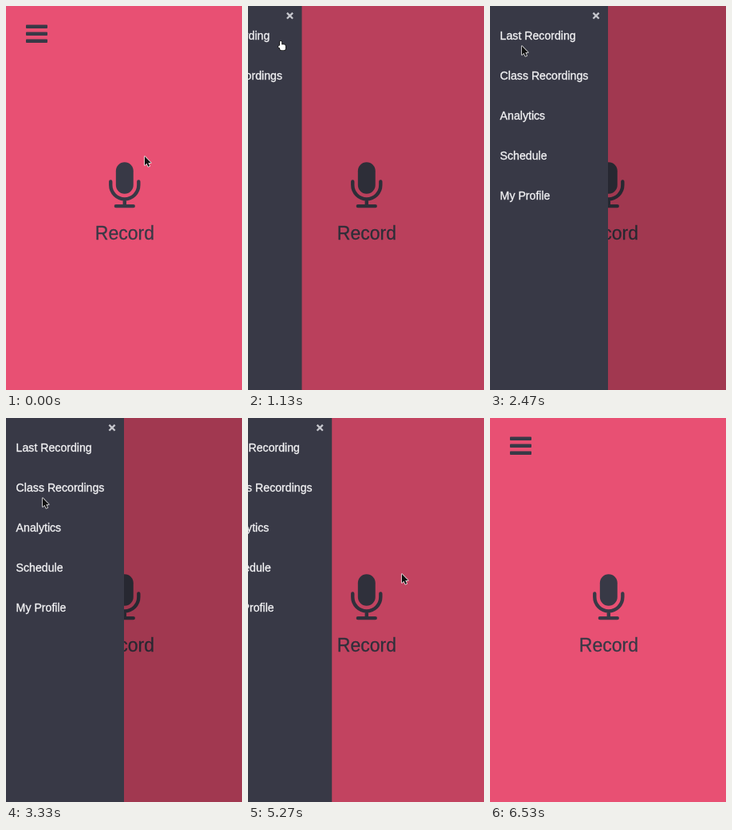
An HTML page with a canvas for the animation above (7070 ms loop, 296 px wide and 480 px high).

```html
<!DOCTYPE html>
<html lang="en">
<head>
<meta charset="utf-8">
<title>Recorder menu</title>
<style>
html, body { margin: 0; width: 100%; height: 100%; overflow: hidden; background: #e85073; }
canvas { display: block; width: 296px; height: 480px; }
</style>
</head>
<body>
<canvas id="stage" width="296" height="480"></canvas>
<script>
const ctx = document.getElementById('stage').getContext('2d');
const W = 296, H = 480, LOOP = 7070, STEP = 200 / 3;
const PINK = '#e85073', DARK = '#383946';
const FONT = '"Liberation Sans", Arial, sans-serif';
const MENU_FONT = '14.15px ' + FONT;
const PANEL = W / 2, OPEN_AT = 1000, CLOSE_AT = 5170;
const SLIDE = 490, FADE = 350;
const LINKS = ['Last Recording', 'Class Recordings', 'Analytics', 'Schedule', 'My Profile'];
const LEFT = 12.6;

const rowY = i => 37 + 50 * i;

// Where the pointer is headed and when it arrives; it rests briefly at each stop.
const REST = STEP, POINTER_END = 5533;
const burger = { x: 41, y: 44 };
const STOPS = [
  { at: 0, x: 174, y: 188 },
  { at: 733, ...burger },
  { at: 1335, ...burger },
  { at: 1667, x: 170, y: 276 },
  { at: 2467, x: 40, y: rowY(0) + 13 },
  { at: 3267, x: 46, y: rowY(1) + 13 },
  { at: 4000, x: 46, y: rowY(3) },
  { at: 4267, x: 43, y: rowY(4) - 5 },
  { at: 4733, x: 133, y: 9 },
  { at: 5133, x: 193, y: 195 }
];

const clamp = v => Math.min(1, Math.max(0, v));
const mix = (a, b, k) => a + (b - a) * k;

// CSS "ease": cubic-bezier(.25, .1, .25, 1)
function ease(x) {
  if (x <= 0 || x >= 1) return clamp(x);
  const curve = (a, b, s) => 3 * a * s * (1 - s) ** 2 + 3 * b * s * s * (1 - s) + s ** 3;
  let lo = 0, hi = 1;
  for (let i = 0; i < 24; i++) {
    const mid = (lo + hi) / 2;
    if (curve(0.25, 0.25, mid) < x) lo = mid; else hi = mid;
  }
  return curve(0.1, 1, lo);
}

const openness = (t, duration) => t < CLOSE_AT
  ? ease((t - OPEN_AT) / duration)
  : 1 - ease((t - CLOSE_AT) / duration);

function pointerAt(t) {
  if (t > POINTER_END) return null;
  const i = STOPS.findIndex(s => s.at > t);
  if (i < 0) return STOPS[STOPS.length - 1];
  const from = STOPS[i - 1], to = STOPS[i], leave = from.at + REST;
  const k = (1 - Math.cos(Math.PI * clamp((t - leave) / (to.at - leave)))) / 2;
  return { x: mix(from.x, to.x, k), y: mix(from.y, to.y, k) };
}

const inside = (p, x, y, w, h) => !!p && p.x >= x && p.x <= x + w && p.y >= y && p.y <= y + h;

function linkUnder(p) {
  ctx.font = MENU_FONT;
  return LINKS.findIndex((label, i) =>
    inside(p, LEFT, rowY(i) - 8, ctx.measureText(label).width, 14.5));
}

function pill(x, y, w, h, r) {
  ctx.beginPath();
  ctx.roundRect(x, y, w, h, r);
  ctx.fill();
}

// A hairline stroke gives the letters slightly heavier stems.
function label(text, x, y, font, color) {
  ctx.font = font;
  ctx.fillStyle = ctx.strokeStyle = color;
  ctx.lineWidth = 0.3;
  ctx.fillText(text, x, y);
  ctx.strokeText(text, x, y);
}

function drawBurger(hover) {
  ctx.globalAlpha = hover ? 0.55 : 1;
  ctx.fillStyle = DARK;
  for (let i = 0; i < 3; i++) pill(25, 23.5 + i * 9, 27, 4.5, 0.9);
  ctx.globalAlpha = 1;
}

// Drawn in units of the stroke width, centred on the stem.
function drawMic() {
  ctx.save();
  ctx.translate(148.8, 195.3);
  ctx.scale(4.384, 4.384);
  ctx.fillStyle = ctx.strokeStyle = DARK;
  ctx.lineWidth = 1;
  ctx.lineCap = 'round';
  pill(-2.5, 0, 5, 9, 2.5);
  ctx.beginPath();
  ctx.moveTo(-4, 5.5);
  ctx.arc(0, 6.5, 4, Math.PI, 0, true);
  ctx.lineTo(4, 5.5);
  ctx.moveTo(0, 10.5);
  ctx.lineTo(0, 12.5);
  ctx.moveTo(-2.5, 12.5);
  ctx.lineTo(2.5, 12.5);
  ctx.stroke();
  ctx.restore();
}

function drawClose(x, y, r) {
  ctx.strokeStyle = '#c6c7cd';
  ctx.lineWidth = 2.3;
  ctx.beginPath();
  for (const side of [-1, 1]) {
    ctx.moveTo(x - r * side, y - r);
    ctx.lineTo(x + r * side, y + r);
  }
  ctx.stroke();
}

function drawPanel(edge, hovered) {
  ctx.save();
  ctx.translate(edge - PANEL, 0);
  ctx.fillStyle = DARK;
  ctx.fillRect(0, 0, PANEL, H);
  LINKS.forEach((text, i) =>
    label(text, LEFT, rowY(i) + 5, MENU_FONT, i === hovered ? '#ec4f74' : '#f4f4f6'));
  drawClose(133, 12.2, 3.6);
  ctx.restore();
}

const ARROW = new Path2D('M0 0V11L2.5 8.7L4.3 12.8L6.1 12L4.4 8.1H7.8Z');
const HAND = new Path2D();
HAND.roundRect(-1, 0, 2.2, 8, 1.1);
HAND.roundRect(-1, 4.2, 7, 7, 2);
HAND.roundRect(-2.8, 5.5, 4, 2.8, 1.2);

function drawPointer(p, hand) {
  const shape = hand ? HAND : ARROW;
  ctx.save();
  ctx.translate(p.x, p.y);
  ctx.lineJoin = 'round';
  ctx.lineWidth = 1.5;
  ctx.strokeStyle = hand ? '#111' : '#eee';
  ctx.fillStyle = hand ? '#fff' : '#111';
  ctx.stroke(shape);
  ctx.fill(shape);
  ctx.restore();
}

function draw(t) {
  const edge = PANEL * openness(t, SLIDE);
  const shade = 0.305 * openness(t, FADE);
  const p = pointerAt(t);
  const menuReady = edge > PANEL - 1;
  const onBurger = t < CLOSE_AT && !menuReady && inside(p, 24, 22, 29, 26);
  const onClose = menuReady && inside(p, 127, 5, 12, 13);
  const hovered = menuReady ? linkUnder(p) : -1;

  ctx.fillStyle = PINK;
  ctx.fillRect(0, 0, W, H);
  drawBurger(onBurger);
  drawMic();
  label('Record', 111.8, 292.3, '23px ' + FONT, DARK);

  ctx.fillStyle = `rgba(0,0,0,${shade})`;
  ctx.fillRect(0, 0, W, H);
  if (edge > 0) drawPanel(edge, hovered);
  if (p) drawPointer(p, onBurger || onClose || hovered >= 0);
}

const start = performance.now();
function tick() {
  const t = (performance.now() - start) % LOOP;
  draw(Math.floor((t + 3.4) / STEP) * STEP);
  requestAnimationFrame(tick);
}
tick();
</script>
</body>
</html>
```
